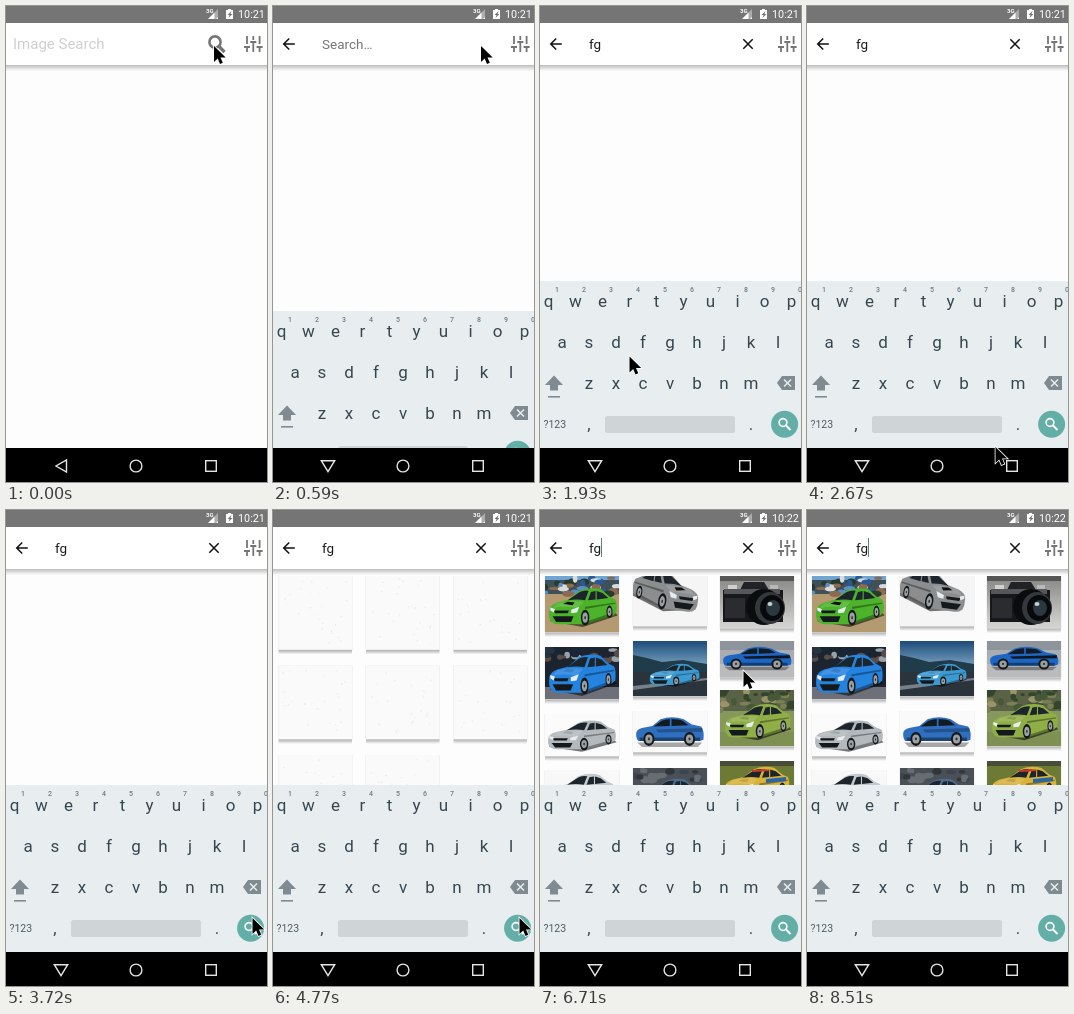
Animation of 261 by 476 pixels, one loop 8610 ms. Source, as an HTML page:

```html
<!DOCTYPE html>
<html lang="en">
<head>
<meta charset="utf-8">
<title>Image Search</title>
<style>
html, body { margin: 0; width: 100%; height: 100%; overflow: hidden; background: #fdfdfd; }
#stage { display: block; width: 100vw; height: 100vh; }
text { font-family: Roboto, sans-serif; }
.key { font-size: 17px; fill: #37474f; text-anchor: middle; }
.hint { font-size: 7px; font-weight: 500; fill: #6f7b80; text-anchor: middle; }
</style>
</head>
<body>
<svg id="stage" viewBox="0 0 261 476">
  <defs>
    <linearGradient id="drop" x2="0" y2="1">
      <stop offset="0" stop-color="#000" stop-opacity=".34"/>
      <stop offset="1" stop-color="#000" stop-opacity="0"/>
    </linearGradient>
    <linearGradient id="grey" x2="0" y2="1">
      <stop offset="0" stop-color="#858684"/><stop offset="1" stop-color="#d6d6d4"/>
    </linearGradient>
    <linearGradient id="dusk" x2="0" y2="1">
      <stop offset="0" stop-color="#1d4a78"/><stop offset=".4" stop-color="#6d97b8"/><stop offset="1" stop-color="#26384a"/>
    </linearGradient>
  </defs>
  <rect width="261" height="476" fill="#fdfdfd"/>
  <g id="blanks"></g>
  <g id="photos"></g>

  <rect y="59" width="261" height="6" fill="url(#drop)" opacity=".75"/>
  <rect y="17" width="261" height="42" fill="#fff"/>
  <g id="home">
    <text x="7" y="43" font-size="15" fill="#cfcfcf">Image Search</text>
    <g fill="none" stroke="#757575"><circle cx="209" cy="36" r="5.6" stroke-width="2.6"/><path d="M213 40.5l5.5 5.5" stroke-width="3.2"/></g>
  </g>
  <g id="search">
    <path d="M21.800 38H11M16.200 32.500L10.700 38l5.500 5.500" fill="none" stroke="#111" stroke-width="1.5"/>
    <text id="query" x="49" y="43" font-size="13.5"></text>
    <path id="clear" d="M203.300 33.300l9.400 9.400m0-9.400l-9.400 9.400" stroke="#111" stroke-width="1.5"/>
    <rect id="caret" y="28" width="1" height="19" fill="#5f7f7b"/>
  </g>
  <path d="M241 30v8m0 2v6M247.300 30v4m0 2v10M253.600 30v8m0 2v6M238 41h6M244.300 36h6M250.600 41h6" stroke="#757575" stroke-width="1.8"/>

  <rect width="261" height="17" fill="#757575"/>
  <g fill="#fff">
    <text x="200" y="7" font-size="6" font-weight="700">3G</text>
    <path d="M212 3v10h-10z" opacity=".4"/><path d="M208.500 6.500v6.500h-6.500zM212 11v2h-2z"/>
    <path d="M220 4h2V3h3v1h2v9h-7z"/><path d="M225.500 5l-4 4h2l-1 3 4-4h-2z" fill="#757575"/>
    <text id="clock" x="232" y="12" font-size="10.800"></text>
  </g>

  <g id="keyboard"></g>
  <rect y="442" width="261" height="34"/>
  <g fill="none" stroke="#e4e4e4" stroke-width="1.4">
    <path id="back"/><circle cx="130" cy="460" r="5.900"/><rect x="199.700" y="454.700" width="10.600" height="10.600"/>
  </g>
  <path id="mouse" d="M0 0V16L3.700 12.500 6 18 8.800 16.800 6.500 11.500H11.700Z" stroke="#fff" stroke-width="1.600" paint-order="stroke"/>
</svg>
<script>
const $ = id => document.getElementById(id);
const LOOP = 8610, TICK = 149.4;

let seed = 7;
const rnd = () => (seed = seed * 16807 % 2147483647) / 2147483647;

const rect = (x, y, w, h, fill) => `<rect x="${x}" y="${y}" width="${w}" height="${h}" fill="${fill}"/>`;
const shape = (d, fill) => `<path d="${d}" fill="${fill}"/>`;
const oval = (x, y, rx, ry, fill) => `<ellipse cx="${x}" cy="${y}" rx="${rx}" ry="${ry}" fill="${fill}"/>`;
const wheel = (x, y, rx, ry) => oval(x, y, rx, ry, '#15181a') + oval(x, y, rx * .65, ry * .65, '#9ba0a3') + oval(x, y, rx * .2, ry * .2, '#333');
const place = (x, y, sx, sy, art, turn = 0) => `<g transform="translate(${x} ${y}) rotate(${turn}) scale(${sx} ${sy})">${art}</g>`;

// Sedan seen from the front left corner, in a 60 by 30 box
const car = (color, scoop = '#0002') =>
  shape('M2 25L30 29 60 21 57 18H4Z', '#0008') +
  shape('M1 18Q1 14 8 12L18 10 27 4Q36 1 46 3L53 8 58 10Q60 13 59 19L56 21 32 27H9Q2 27 1 22Z', color) +
  shape('M17 10.500L27 5Q31 3.500 35 4L32 10.500Q25 9.500 17 10.500Z', '#1c252b') +
  shape('M34.500 10.500L37 4.800 41 4.200V10ZM42 10V4.200L47 5.500 52 9Z', '#1c252b') +
  shape('M8 12.500Q18 10.500 31 11.500L25 16Q14 14 4 16Z', '#fff2') + shape('M13 13l4-1.500 6 .5-2 2z', scoop) +
  shape('M32 15L58 12V13L32 16.500ZM34 25L56 19V21L32 27Z', '#0005') +
  shape('M5 17.500H18L17 19.500H6Z', '#14191c') + shape('M4 21.500H22L20 25.500H7Z', '#14191c') +
  shape('M2 15.500l4 1-1 2.500-3-1.500zM20 17l7-2-2 4-5 .5z', '#e6edef') +
  wheel(32, 22.5, 3.6, 5.4) + wheel(53, 18.5, 2.6, 4.3);

// Sedan seen from the side, in a 60 by 22 box
const side = (color, trim = '#0004') =>
  shape('M2 19H58L54 22H6Z', '#0005') +
  shape('M1 13Q1 10 6 9L15 7.500 22 3Q32 0 42 3L49 6.500 57 8Q60 11 59 17L56 18H3Q1 17 1 13Z', color) +
  shape('M16 8L23 4Q27 2.800 30 2.800V7.500ZM31.500 7.500V2.800Q38 3 41 4L46 7Z', '#131b22') +
  shape('M4 15.500H56V18H4Z', '#0006') + shape('M18 10L58 9V11.500L20 12Z', trim) +
  wheel(12, 16.5, 4.8, 4.8) + wheel(47, 16.5, 4.8, 4.8);

const blots = (n, w, h, tones) => Array.from({ length: n }, () =>
  oval(rnd() * w, rnd() * h, 2 + rnd() * 4, 1.5 + rnd() * 2.5, tones[Math.floor(rnd() * tones.length)])).join('');

const camera = rect(0, 0, 74, 52, 'url(#grey)') + rect(0, 0, 74, 5, '#555654') +
  rect(3, 14, 60, 32, '#17181a') + shape('M20 14L24 6H44L49 14Z', '#202225') + rect(4, 13, 56, 5, '#55575a') +
  rect(8, 9, 9, 4, '#d0d0cd') + rect(50, 9, 8, 4, '#b8b8b6') + rect(5, 22, 20, 20, '#2a2c2f') +
  oval(44, 31, 18, 18, '#0b0c0e') + oval(50, 32, 15, 16, '#34373b') + oval(52, 32, 12, 13, '#08090b') +
  oval(53, 32, 7, 8, '#2b3840') + oval(50, 28, 2.5, 2, '#c4cfd4');

// x, y, width, height, fade group, drawing
const photos = [
  [5, 66, 74, 56, 0, rect(0, 0, 74, 56, '#b39a70') + rect(0, 0, 74, 5, '#6fa5d2') + rect(0, 4, 74, 14, '#40505a') +
    blots(34, 74, 18, ['#2a5a93', '#d9dcdb', '#263a2d', '#5c8fc0', '#8a6a50']) + place(3, 9, 1.16, 1.45, car('#4cb32a', '#111'))],
  [93, 66, 74, 50, 0, rect(0, 0, 74, 50, '#f5f5f5') + place(70, -3, -1.14, 1.5, car('#8b8d8e', '#111'), 8)],
  [180, 66, 74, 52, 0, camera],
  [5, 137, 74, 52, 0, rect(0, 0, 74, 52, '#1c2430') + blots(22, 74, 15, ['#27343f', '#97a2aa', '#172638', '#5a4c48']) +
    rect(0, 40, 74, 12, '#6d7078') + place(3, 4, 1.14, 1.55, car('#2583e0'))],
  [93, 131, 74, 55, 0, rect(0, 0, 74, 55, 'url(#dusk)') + shape('M0 14L14 17 29 21 50 19 74 23V33H0Z', '#203b49') +
    rect(0, 31, 74, 24, '#2b343d') + shape('M0 45L74 37V39L0 49Z', '#77818a') + place(16, 21, .85, .85, car('#3c9ad2'))],
  [180, 131, 74, 36, 1, rect(0, 0, 74, 36, '#a9adb2') + rect(0, 0, 74, 9, '#8d949c') + rect(0, 23, 74, 13, '#b9bbbd') +
    place(2, 4, 1.17, 1.15, side('#1c66c4', '#10161d'))],
  [5, 204, 74, 42, 0, rect(0, 0, 74, 42, '#fbfbfb') + place(2, 4, 1.16, 1.16, car('#b3b9bd'))],
  [93, 201, 74, 41, 1, rect(0, 0, 74, 41, '#fafafa') + place(2, 4, 1.16, 1.45, side('#2f6fc0'))],
  [180, 180, 74, 56, 1, rect(0, 0, 74, 56, '#87985c') + rect(0, 0, 74, 21, '#5a6246') +
    blots(34, 74, 20, ['#34452d', '#7a7f56', '#9a9468', '#45583a']) + rect(0, 42, 74, 14, '#7f9152') + place(4, 11, 1.12, 1.35, car('#8fae45'))],
  [5, 260, 74, 50, 1, rect(0, 0, 74, 50, '#f8f8f8') + place(3, 1, 1.12, 1.3, car('#c3c9ce'))],
  [93, 258, 74, 50, 1, rect(0, 0, 74, 50, '#4a5055') + blots(16, 74, 14, ['#30363a', '#666e73', '#3d4650']) + place(6, 8, 1, 1.2, car('#496e91'))],
  [180, 251, 74, 50, 1, rect(0, 0, 74, 50, '#6c7a35') + rect(0, 0, 74, 5, '#474d38') +
    place(4, 3, 1.1, 1.3, car('#d9b23a')) + shape('M31 9l14-1 6 2-18 1z', '#c63c2c') + shape('M46 18l20-2v4l-20 2z', '#2765a6')]
];

const card = (x, y, w, h) => rect(x, y + h, w, 5, 'url(#drop)') + rect(x - .5, y, w + 1, h + .5, '#e9e9e9') + rect(x, y, w, h, '#fafafa');

const speck = (x, y) => {
  const px = x + 4 + rnd() * 65, py = y + 4 + rnd() * 64;
  return `<path d="M${px} ${py}l${rnd() * 4 - 2} ${rnd() * 4 - 2}" stroke="#e9e9e9"/>`;
};

$('blanks').innerHTML = Array.from({ length: 8 }, (_, i) => {
  const x = [5.5, 93, 180.5][i % 3], y = 66 + Math.floor(i / 3) * 89.5;
  return card(x, y, 73.5, 73.5) + Array.from({ length: 26 }, () => speck(x, y)).join('');
}).join('');

$('photos').innerHTML = photos.map(([x, y, w, h, group, art]) => card(x, y, w, h) +
  `<svg class="fade${group}" x="${x}" y="${y}" width="${w}" height="${h}" overflow="hidden">${art}</svg>`).join('');

const row = (keys, x, y) => [...keys].map((c, i) => `<text class="key" x="${x + i * 27}" y="${y}">${c}</text>`).join('');
$('keyboard').innerHTML = rect(0, 275, 261, 201, '#e8edf0') +
  row('qwertyuiop', 8.5, 301) + row('asdfghjkl', 22, 342) + row('zxcvbnm', 49, 383) +
  [...'1234567890'].map((c, i) => `<text class="hint" x="${17 + i * 27}" y="286">${c}</text>`).join('') +
  shape('M14 369.500L23 379H18V384.500H10V379H5Z', '#7f8b90') + rect(8, 390, 12, 1.6, '#7f8b90') +
  shape('M237 377L242 370H255V384H242Z', '#7f8b90') +
  '<path d="M244 373.500l7 7m0-7l-7 7" stroke="#e8edf0" stroke-width="1.5"/>' +
  '<text x="3.500" y="422" font-size="10.500" fill="#4f5d64">?123</text>' +
  '<text class="key" x="49" y="424">,</text><text class="key" x="211" y="424">.</text>' +
  '<rect x="65" y="410" width="130" height="17" rx="2.500" fill="#cfd4d7"/>' +
  oval(244.6, 418.2, 13.5, 13.5, '#63afa8') +
  '<g fill="none" stroke="#fff"><circle cx="243" cy="416.500" r="3.900" stroke-width="1.600"/><path d="M246 419.500l4.500 4.500" stroke-width="2"/></g>';

// tick, x, y of the pointer
const path = [
  [0, 208, 40], [4, 208, 40], [5, 186, 100], [6, 186, 100], [8, 120, 300], [9, 93, 346], [10, 89.5, 350.5], [15, 89.5, 350.5],
  [16, 118, 378], [17, 154, 420], [18, 188.5, 441], [19, 212, 434], [21, 235, 414], [23, 246.5, 408], [42, 246.5, 408],
  [43, 240, 350], [44, 216, 230], [45, 203.5, 161], [46, 198, 160], [49, 192, 230], [50, 190, 290], [52, 184, 425], [53, 182, 480], [60, 182, 480]
];

function pointer(k) {
  const i = path.findIndex(p => p[0] > k), [k0, x0, y0] = path[i - 1], [k1, x1, y1] = path[i];
  const f = (k - k0) / (k1 - k0);
  return [x0 + (x1 - x0) * f, y0 + (y1 - y0) * f];
}

const show = (id, on) => $(id).setAttribute('opacity', +on);
const fade = (group, a) => document.querySelectorAll('.fade' + group).forEach(e => e.setAttribute('opacity', a));

function draw(time) {
  const k = Math.floor((time % LOOP + 22) / TICK);
  const typed = 'fg'.slice(0, Math.max(0, k - 11));
  const open = k < 2 ? 0 : k < 3 ? .3 : k < 4 ? .75 : 1;

  show('home', 1 - open);
  show('search', open);
  $('query').textContent = typed || 'Search…';
  $('query').setAttribute('fill', typed ? '#1b1b1b' : '#757575');
  show('clear', typed !== '');
  const beat = k % 7;
  show('caret', k > 3 && (beat > 0 && beat < 4 || k === 39));
  $('caret').setAttribute('x', [49, 53.5, 61][typed.length]);
  $('clock').textContent = k < 38 ? '10:21' : '10:22';

  show('keyboard', k > 2);
  $('keyboard').setAttribute('transform', `translate(0 ${k < 4 ? 110 : k < 5 ? 30 : 0})`);
  $('back').setAttribute('d', k < 4 ? 'M60.500 454V466L50 460Z' : 'M48.300 454.700H61.700L55 465.700Z');

  show('blanks', k >= 32 && k < 36);
  show('photos', k >= 36);
  fade(0, k < 38 ? .4 : k < 39 ? .8 : 1);
  fade(1, k < 38 ? 0 : k < 39 ? .12 : k < 40 ? .38 : 1);

  $('mouse').setAttribute('transform', `translate(${pointer(k)})`);
}

const start = performance.now();
function loop() {
  draw(performance.now() - start);
  requestAnimationFrame(loop);
}
loop();
</script>
</body>
</html>
```
